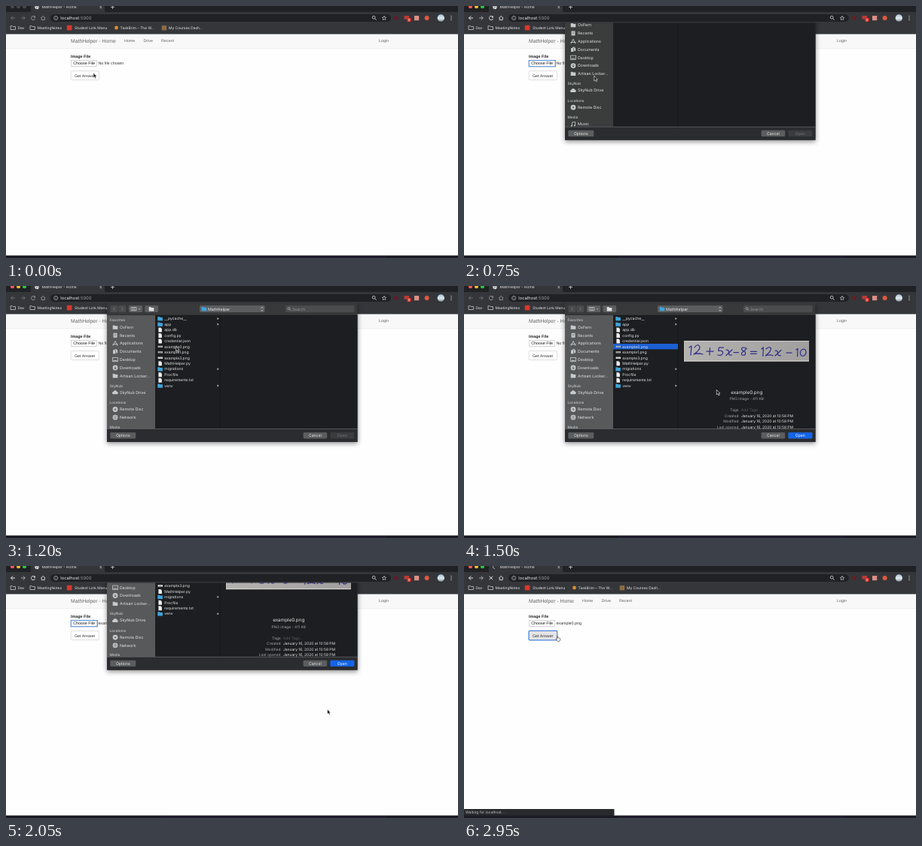
These frames come from a looping animation (600x336 px, 3000 ms). An HTML page:

```html
<!DOCTYPE html>
<html lang="en">
<head>
<meta charset="utf-8">
<title>MathHelper - Home</title>
<style>
html, body { margin: 0; width: 100%; height: 100%; overflow: hidden; background: #fefefe; }
svg { display: block; width: 600px; height: 336px; }
text { white-space: pre; text-rendering: geometricPrecision; }
.ui { font-family: Inter, Roboto, sans-serif; }
.web { font-family: "Liberation Sans", Arial, sans-serif; }
</style>
</head>
<body>
<svg id="stage" viewBox="0 0 600 336"></svg>
<script>
const LOOP = 3000, STEP = 50;

// Shape helpers; text is placed by its vertical centre.
const rect = (x, y, w, h, fill, more = "") =>
  `<rect x="${x}" y="${y}" width="${w}" height="${h}" fill="${fill}" ${more}/>`;
const dot = (x, y, r, fill, more = "") =>
  `<circle cx="${x}" cy="${y}" r="${r}" fill="${fill}" ${more}/>`;
const line = (d, color, width = 0.8, more = "") =>
  `<path d="${d}" fill="none" stroke="${color}" stroke-width="${width}" ${more}/>`;
const area = (d, fill, more = "") => `<path d="${d}" fill="${fill}" ${more}/>`;
const group = (id, body, more = "") => `<g id="${id}" ${more}>${body}</g>`;
const at = (x, y, body) => `<g transform="translate(${x} ${y})">${body}</g>`;
const text = (x, y, s, size, fill, cls = "ui", more = "") =>
  `<text class="${cls}" x="${x}" y="${y + size * 0.35}" font-size="${size}" fill="${fill}" ${more}>${s}</text>`;
const MID = 'text-anchor="middle"', END = 'text-anchor="end"', BOLD = 'font-weight="700"';

const folder = (x, y, fill) => at(x, y, area("M-3.3 -2.6h2.5l.8 .8h3.3v4.5h-6.6z", fill));
const hollowFolder = (x, y) =>
  at(x, y, line("M-3.2 -2.4h2.3l.8 .9h3.3v4h-6.4z", "#d0d2d4", 0.75));
const page = (x, y) => at(x, y, area("M-2.2 -3h3l1.5 1.5v4.5h-4.5z", "#f1f1f1") +
  line("M.8 -3v1.5h1.5", "#999", 0.4));

function browser() {
  const tabs = rect(0, 0, 600, 8.5, "#202124") +
    area("M31 8.5q2 0 2-2V0H131v6.5q0 2 2 2z", "#35363a") +
    rect(0, 8, 600, 29.5, "#35363a") +
    group("dimLights", [8.5, 16.5, 24.5].map(x => dot(x, 0.8, 2.5, "#45474a")).join("")) +
    group("lights", dot(8.5, 0.8, 2.5, "#ff5a50") + dot(16.5, 0.8, 2.5, "#f5bd2f") +
      dot(24.5, 0.8, 2.5, "#2cc940")) +
    group("globe", dot(41, 1.6, 2.7, "#e8eaed") +
      line("M39 0.5l2 1.2-1 2.2M42 -1l-.2 2 1.6 1", "#55585c", 0.7)) +
    group("spinner", line("M40.8 3.6A2.5 2.5 0 0 1 39 -.3", "#b9bec6", 0.9)) +
    text(47.5, 1.6, "MathHelper - Home", 4.95, "#dfe1e5") +
    line("M124.2 -.1l3.2 3.2m0-3.2l-3.2 3.2", "#d5d7da", 0.7) +
    line("M141.5 -1v5m-2.5-2.5h5", "#d5d7da", 0.75);

  const nav = group("back", line("M12 16H6.6m2.5-2.6L6.5 16l2.6 2.6", "#eceef0", 0.95)) +
    group("forward", line("M20 16h5.2m-2.5-2.6l2.6 2.6-2.6 2.6", "#eceef0", 0.95)) +
    group("reload", line("M38 14.3A2.6 2.6 0 1 0 38.6 16.7", "#eceef0", 0.9) +
      area("M38.9 13v2.5h-2.5z", "#eceef0")) +
    group("stop", line("M33.6 13.6l4.6 4.6m0-4.6l-4.6 4.6", "#eceef0", 0.95)) +
    group("house", line("M46.3 16l2.9-2.6 2.9 2.6M47.2 15.5v3.1h4v-3.1", "#eceef0", 0.85));

  const bar = rect(59, 11, 452, 10, "#202124", 'rx="5"') +
    dot(66.2, 16, 2.6, "none", 'stroke="#c4c7cb" stroke-width=".65"') +
    line("M66.2 15.7v1.7m0-3.1v.7", "#c4c7cb", 0.65) +
    text(72.3, 16, 'localhost<tspan fill="#9aa0a6">:5000</tspan>', 5.85, "#eceef0") +
    dot(488.2, 15.2, 1.9, "none", 'stroke="#d5d7da" stroke-width=".8"') +
    line("M489.6 16.6l2 2", "#d5d7da", 0.9) +
    at(502, 16, line("M0 -2.8L.8 -.9l2 .2L1.3 .6l.4 2L0 1.6l-1.7 1 .4-2L-2.8 -.7l2-.2z", "#d5d7da", 0.65)) +
    dot(518, 16, 2.5, "#6b1820") +
    rect(528.5, 13, 6.6, 4.5, "#b83a35") + rect(532.4, 16, 5.2, 5, "#e0352f", 'rx="1"') +
    text(535, 18.6, "6", 4, "#fff", "ui", MID) +
    rect(542, 13, 6.2, 6.2, "#dc8e87") + dot(558.6, 16, 3, "#e2573e") +
    dot(577.3, 16, 4.7, "url(#portrait)") +
    [13.6, 16, 18.4].map(y => dot(591, y, 0.7, "#dfe1e5")).join("");

  const mark = (x, s) => text(x, 29, s, 4.9, "#e4e6e9");
  const marks = hollowFolder(9.3, 29) + mark(15.5, "Dev") +
    hollowFolder(35.2, 29) + mark(41.6, "MeetingNotes") +
    rect(80.8, 25.7, 6.6, 6.6, "#d9372f") + mark(91, "Student Link Menu") +
    dot(146.5, 29, 2.4, "#d8922f") + mark(151.6, "TaskBrim – The W...") +
    rect(206.7, 26, 6.4, 6.4, "#8a6b45") + mark(216, "My Courses Dash...");

  return tabs + nav + bar + marks;
}

function site() {
  const web = (x, y, s, size = 5.35, fill = "#333", more = "") => text(x, y, s, size, fill, "web", more);
  return rect(0, 37.5, 600, 19, "#f8f8f8") + rect(0, 56.2, 600, 0.5, "#e0e0e0") +
    web(86, 46.5, "MathHelper - Home", 6.86, "#666") +
    web(157, 46.4, "Home", 5.35, "#666") + web(182.5, 46.4, "Drive", 5.35, "#666") +
    web(206, 46.4, "Recent", 5.35, "#666") + web(495, 46.4, "Login", 5.35, "#666") +
    web(86, 67.6, "Image File", 5.35, "#222", BOLD) +
    rect(86.3, 72.6, 34.2, 8, "#fff", 'stroke="#b9b9b9" stroke-width=".6"') +
    group("pickRing", rect(86.2, 72.5, 35.2, 8.3, "none", 'stroke="#5b93dd" stroke-width="1.1"')) +
    web(89.2, 76.6, "Choose File", 5.4, "#111") +
    group("noFile", web(122.4, 76.6, "No file chosen")) +
    group("gotFile", web(122.4, 76.6, "example0.png")) +
    rect(86.2, 86.6, 37.2, 12, "#fff", 'id="answer" rx="1.5" stroke="#c8c8c8" stroke-width=".6"') +
    group("answerRing", rect(86, 86.3, 37.8, 12.6, "none", 'rx="1.5" stroke="#4a86e0" stroke-width="1.2"')) +
    web(91, 92.7, "Get Answer", 5.3);
}

// Small grey sidebar glyphs drawn around the origin.
const glyphs = {
  folder: folder(0, 0, "#c9cacb"),
  recent: area("M-2.5 -3h5v6h-5z", "#c9cacb") + line("M-1.3 -1.2h2.6M-1.3 .4h2.6", "#555", 0.6),
  apps: line("M-3 3L0 -3L3 3M-3.6 1.2h7.2", "#c9cacb", 0.9),
  docs: area("M-3 -2h3.4v5h-3.4z", "#c9cacb") + area("M-.8 -3.2h2.3l1.6 1.5v3.7h-2v-4h-1.9z", "#c9cacb"),
  desk: rect(-3.4, -2.6, 6.8, 5.2, "none", 'stroke="#c9cacb" stroke-width=".8"') + rect(-2.6, 0.7, 5.2, 1, "#c9cacb"),
  down: dot(0, 0, 3.4, "#c9cacb") + line("M0 -2v3.6m-1.5-1.5L0 1.7l1.5-1.6", "#444", 0.8),
  cloud: area("M-2.3 2.3a1.6 1.6 0 0 1-.2-3.2a2.5 2.5 0 0 1 4.7-.3a1.8 1.8 0 0 1 .3 3.5z", "#c9cacb"),
  disc: dot(0, 0, 3.4, "#c9cacb") + dot(0, 0, 1.2, "#555") + dot(0, 0, 0.5, "#ddd"),
  net: dot(0, 0, 3.4, "#c9cacb") + line("M-2.6 -1h5.2M-2.6 1h5.2M0 -3v6", "#666", 0.5),
  music: line("M-1.5 2V-2.4L2.6 -3.2V1.3", "#c9cacb", 0.8) + dot(-2.2, 2.2, 1, "#c9cacb") + dot(1.9, 1.5, 1, "#c9cacb")
};

function sidebar() {
  const head = (y, s) => text(137.5, y, s, 4.7, "#c6c6c6", "ui", 'font-weight="500"');
  const item = (y, icon, s) => at(145, y, glyphs[icon]) + text(151, y, s, 5.3, "#e4e4e4");
  const favorites = [["folder", "OxFern"], ["recent", "Recents"], ["apps", "Applications"],
    ["docs", "Documents"], ["desk", "Desktop"], ["down", "Downloads"], ["folder", "Artisan Locker..."]];
  return rect(134, 39, 64, 151.5, "#3b3d3d", 'id="side"') + head(45.7, "Favorites") +
    favorites.map(([icon, s], i) => item(55 + i * 10.78, icon, s)).join("") +
    head(133, "SkyNub") + item(142, "cloud", "SkyNub Drive") +
    head(155.3, "Locations") + item(164.5, "disc", "Remote Disc") +
    group("sideEarly", head(177.8, "Media") + item(187, "music", "Music")) +
    group("sideLate", item(175.2, "net", "Network") + head(188.2, "Media"));
}

function fileList() {
  const names = ["__pycache__/", "app/", "app.db", "config.py", "credential.json", "example0.png",
    "example1.png", "example3.png", "MathHelper.py", "migrations/", "Procfile", "requirements.txt", "venv/"];
  const row = (s, i) => {
    const y = 43.6 + i * 7.46, dir = s.endsWith("/");
    const icon = dir ? folder(204.6, y, "#3fa5dd")
      : s.endsWith(".png") ? rect(201.6, y - 1.2, 6.4, 2.3, i === 7 ? "#eee" : "#b5b5b3") + rect(202.8, y - 0.2, 4, 0.5, "#666")
      : page(204.6, y);
    return icon + text(210.3, y, s.replace("/", ""), 5, "#e6e6e6") +
      (dir ? area(`M280.3 ${y - 1.5}l2.8 1.5-2.8 1.5z`, "#a0a0a0") : "");
  };
  return group("picked", rect(198, 77, 86, 7.4, "#1b5fd3")) + names.map(row).join("");
}

function preview() {
  const ink = "M299 82l3-2-1 12M306 82q4-6 7-1q0 5-8 10q5-2 12 0" +
    "M322 87.2h9M326.5 82.5l-.5 9.5" +
    "M344.5 82h-6l-.8 4.5q6-1.2 6 2.7q-1 4.5-6.8 2.8" +
    "M348 85q4 0 3.5 4t4 3M356 85l-8 7.5M358 88.6h6.5" +
    "M375 83.4q-5-3-6.6 0q0 2 4.6 4.6q2 3.5-2 4.5q-4-.5-2-3.8q4-2.4 6-5.3" +
    "M380.5 87.3h8M380.3 90.4h8" +
    "M395 84l2.4-2-.6 11.5M401 84q4-4 6.4-1q.5 4-7 9.8q5-2 9.6 0" +
    "M413 86q4 0 3.5 3.6t4 3M421 85.5l-8 7.5M428 89h7" +
    "M441 85l2-1.6-.4 10.4M451 84q-5 1-4.6 6q1 4.5 5 3q4-3.5 2-7.5q-1-2-3.6-1";
  const facts = ["Created", "Modified", "Last opened"];
  return rect(292, 73, 166, 27.5, "url(#paper)") + rect(292, 73, 166, 0.9, "#d6d6d2") +
    rect(292, 99.3, 166, 1.2, "#d0d0cc") + rect(292, 73, 0.8, 27.5, "#c8c8c4") +
    line(ink, "#30318a", 1.25, 'stroke-linecap="round" stroke-linejoin="round"') +
    text(375.2, 141.6, "example0.png", 6.3, "#e4e4e4", "ui", MID) +
    text(375.2, 150.4, "PNG image - 411 KB", 4.85, "#a6a6a8", "ui", MID) +
    text(364.5, 165.5, "Tags", 4.9, "#a6a6a8", "ui", END) + text(368, 165.5, "Add Tags...", 4.9, "#5c5c60") +
    facts.map((s, i) => text(364.5, 173 + i * 7.4, s, 4.9, "#a6a6a8", "ui", END) +
      text(368, 173 + i * 7.4, "January 16, 2020 at 10:58 PM", 4.95, "#e4e4e4")).join("");
}

function dialog() {
  const key = (x, y, w, h, fill = "#5c5d5f") => rect(x, y, w, h, fill, 'rx="1.4"');
  const label = (x, s, fill = "#ececec") => text(x, 199.3, s, 5.1, fill, "ui", MID);
  const tools = key(138.5, 26, 10, 9, "#4a4b4d") + key(149.3, 26, 10, 9, "#4a4b4d") +
    line("M144.4 28.6l-1.8 1.9 1.8 1.9M153.6 28.6l1.8 1.9-1.8 1.9", "#85868a", 0.75) +
    key(163, 26, 18.2, 9) + key(184.3, 26, 17.8, 9) +
    line("M166.2 28.5h6.8v4.2h-6.8zM168.5 28.5v4.2M170.7 28.5v4.2M176 30l1.2 1.2 1.2-1.2", "#e2e2e2", 0.6) +
    folder(193, 30.7, "#e2e2e2") +
    key(257, 26, 86.5, 9) + folder(263, 30.6, "#3fa5dd") + text(268, 30.7, "MathHelper", 5.3, "#ececec") +
    line("M338.5 29.6l1.4-1.5 1.4 1.5M338.5 31.8l1.4 1.5 1.4-1.5", "#ececec", 0.7) +
    key(371, 26, 91.5, 9, "#4b4c4e") + dot(375.5, 30.1, 1.5, "none", 'stroke="#c4c4c4" stroke-width=".6"') +
    line("M376.6 31.2l1.5 1.5", "#c4c4c4", 0.7) + text(380, 30.7, "Search", 5.2, "#96979a");
  return rect(134, 22.5, 332.5, 185.5, "#323335", 'id="sheetBack"') +
    group("tools", tools) + rect(198, 39, 268.5, 151.5, "#1d1e21") +
    rect(134, 38.8, 332.5, 0.5, "#121314") + sidebar() +
    rect(283.8, 39.3, 0.7, 151, "#111214") +
    group("files", fileList()) + group("preview", preview()) +
    rect(134, 190.7, 332.5, 17.3, "#2b2c2f") + rect(134, 190.2, 332.5, 0.7, "#66686a") +
    key(138.3, 195.2, 34, 8.2) + label(155.3, "Options") +
    key(394.6, 195.2, 31.6, 8.2) + label(410.4, "Cancel") +
    key(430.4, 195.2, 32, 8.2, "#3b3c3f") + label(446.3, "Open", "#77787b") +
    group("openOn", key(430.4, 195.2, 32, 8.2, "#1464e8") + label(446.3, "Open", "#fff"));
}

document.getElementById("stage").innerHTML = `
  <defs>
    <linearGradient id="paper"><stop stop-color="#b5b3b0"/><stop offset="1" stop-color="#a19f9e"/></linearGradient>
    <linearGradient id="portrait" x2="0" y2="1"><stop stop-color="#a9c6df"/><stop offset=".55" stop-color="#dfe7ed"/><stop offset="1" stop-color="#8797a5"/></linearGradient>
    <clipPath id="below"><rect x="100" y="22.5" width="400" height="230"/></clipPath>
  </defs>` +
  rect(0, 0, 600, 336, "#fefefe") + site() + browser() +
  group("status", rect(-2, 324, 201.5, 9, "#292a2d", 'rx="1"') +
    text(2, 328.5, "Waiting for localhost...", 4.95, "#c3c6ca")) +
  rect(0, 332.6, 600, 3.4, "#1a1a24") + rect(205, 334, 300, 2, "#211c30") +
  group("sheetClip", group("sheet", dialog(), 'style="filter:drop-shadow(0 2px 3px rgba(0,0,0,.45))"'),
    'clip-path="url(#below)"') +
  group("cursor",
    group("arrow", area("M0 0V6.5L1.5 5.2L2.6 7.6L3.8 7L2.7 4.8H4.6z", "#111", 'stroke="#fff" stroke-width=".6"')) +
    group("hand", area("M-.2 .2q.6-.6 1.1 0l.3 2q2.4-.2 2.9 1.2q.1 2-1 3.3H.6L-1.7 3.9q.4-.8 1.5-.1z", "#fff", 'stroke="#222" stroke-width=".6"')));

// Visible spans in ms.
const shows = {
  lights: [[400, LOOP]], dimLights: [[0, 400]],
  pickRing: [[400, 800], [2050, 2850]],
  noFile: [[0, 2050]], gotFile: [[2050, LOOP]],
  sheetClip: [[650, 2150]], files: [[1000, 2150]],
  sideEarly: [[0, 1000]], sideLate: [[1000, LOOP]],
  picked: [[1350, 2150]], preview: [[1450, 2150]], openOn: [[1350, 2150]],
  answerRing: [[2850, LOOP]], status: [[2900, LOOP]],
  spinner: [[2900, LOOP]], stop: [[2900, LOOP]],
  globe: [[0, 2900]], reload: [[0, 2900]],
  arrow: [[0, 2800]], hand: [[2800, LOOP]]
};

// Pointer tip: time, x, y.
const path = [[0, 116, 89.3], [100, 116, 89.3], [350, 109, 78.2], [550, 109, 78.2], [600, 112, 79],
  [850, 205.7, 101], [1150, 225.6, 80.3], [1350, 225.6, 80.3], [1650, 445, 196.5], [1750, 447, 197],
  [2000, 447, 197], [2250, 250, 140], [2500, 120, 99], [2600, 120, 98.5], [2800, 123.6, 93.6], [LOOP, 123.6, 93.6]];

const node = id => document.getElementById(id);
const inside = (t, spans) => spans.some(([a, b]) => t >= a && t < b);
const ease = (t, a, b) => { const u = Math.min(1, Math.max(0, (t - a) / (b - a))); return u * u * (3 - 2 * u); };

function render(t) {
  for (const id in shows) node(id).style.display = inside(t, shows[id]) ? "" : "none";
  const front = inside(t, [[400, 1000], [2050, LOOP]]);
  for (const id of ["back", "reload", "house"]) node(id).style.opacity = front ? 1 : 0.55;
  node("back").style.opacity = front ? 1 : 0.3;
  node("forward").style.opacity = front ? 0.65 : 0.3;

  const ready = t >= 1000;
  node("tools").style.opacity = ready ? 1 : 0.4;
  node("side").setAttribute("fill", ready ? "#58595a" : "#3b3d3d");
  node("sheetBack").setAttribute("fill", ready ? "#38393b" : "#303133");
  const open = ease(t, 600, 800) - ease(t, 1980, 2150);
  node("sheet").setAttribute("transform", `translate(0 ${(open - 1) * 188})`);
  node("answer").setAttribute("fill", t >= 2700 ? "#e4e4e4" : "#fff");

  const i = path.findIndex((p, k) => k && t <= p[0]);
  const [a, x0, y0] = path[i - 1], [b, x1, y1] = path[i], u = ease(t, a, b);
  node("cursor").setAttribute("transform", `translate(${x0 + (x1 - x0) * u} ${y0 + (y1 - y0) * u})`);
}

function tick() {
  render(Math.floor(performance.now() % LOOP / STEP) * STEP);
  requestAnimationFrame(tick);
}
tick();
</script>
</body>
</html>
```
